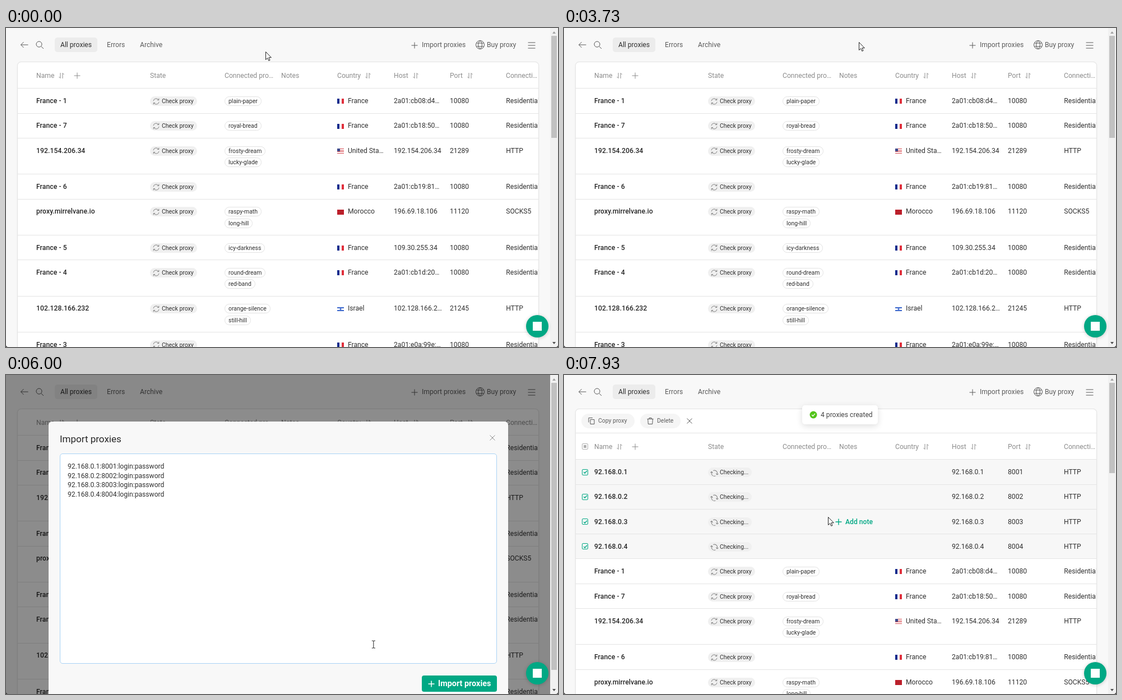
An HTML page that plays this animation: 985x569 px, repeating every 8 s.

```html
<!DOCTYPE html>
<html lang="en">
<head>
<meta charset="utf-8">
<title>Import proxies</title>
<style>
html, body { margin: 0; width: 100%; height: 100%; overflow: hidden; }
body { background: #f8f8f8; font: 12.13px/16px Roboto, Arial, sans-serif; color: #303030; }
#stage { position: relative; width: 985px; height: 569px; overflow: hidden; background: #f8f8f8; }
.p, .box { position: absolute; white-space: pre; }
svg { width: 1px; height: 1px; overflow: visible; fill: none; stroke: #595959; stroke-width: 1; }
.dim { color: #8c8c8c; }
.dim svg, #modal > svg { stroke: #8c8c8c; }
.mid { color: #5c5c5c; }
.name { font-weight: 500; letter-spacing: .1px; color: #262626; }
.small { font-size: 10.45px; color: #5c5c5c; }
.pill, .tag { font-size: 10.45px; line-height: 17px; border-radius: 9px; box-sizing: border-box; height: 17px; }
.pill { background: #f0f0f0; padding: 0 6px 0 21px; }
.pill svg { stroke: #7a7a7a; stroke-width: .9; }
.tag { border: 1px solid #e2e2e2; background: #fff; padding: 0 6px; line-height: 15px; }
.flag { width: 12px; height: 9px; }
#card { left: 21px; top: 61px; width: 929px; height: 600px; overflow: hidden; background: #fff;
  border-radius: 6px 6px 0 0; box-shadow: 0 0 0 1px #e4e4e4, 0 1px 4px #0001; }
.row { position: relative; box-sizing: border-box; border-bottom: 1px solid #e4e4e4; }
.fresh { background: #f7f7f7; }
.new { display: none; }
.added .new { display: block; }
.check { width: 9px; height: 9px; border: 1px solid #00a884; border-radius: 2px; }
.check.gray { border-color: #b0b0b0; }
.green { color: #00a884; font-weight: 500; }
.green svg, .check svg { stroke: #00a884; stroke-width: 1.4; }
#mask { inset: 0; background: #000; }
#modal { left: 76px; top: 83.4px; width: 819.5px; height: 502px; background: #f8f8f8; border-radius: 6px;
  transform-origin: 669px -45.4px; }
#title { left: 20px; top: 22.6px; font-size: 17px; color: #262626; }
#area { left: 20px; top: 56.8px; width: 777.5px; height: 373px; background: #fff; border: 1px solid; border-radius: 5px; }
#area .p { left: 13px; top: 13.8px; line-height: 16.7px; }
#hint { color: #757575; }
#go { left: 666px; top: 452.6px; width: 133.5px; height: 29.4px; border-radius: 4px; background: #00a884;
  color: #fff; font: 700 14.4px/29.4px Roboto, Arial, sans-serif; }
#go svg { stroke: #fff; stroke-width: 1.5; }
#bar { left: 971px; top: 0; width: 14px; height: 569px; background: #f1f1f1; }
#thumb { left: 2px; top: 14px; width: 10px; }
#chat { left: 928px; top: 512px; width: 40px; height: 40px; border-radius: 50%; background: #00a884;
  box-shadow: 0 1px 6px #0003; }
#toast { left: 425px; top: 54px; width: 135px; height: 34px; border-radius: 5px; background: #fff;
  box-shadow: 0 3px 12px #0002; color: #444; }
#panel { left: 628px; top: 0; width: 357px; height: 569px; background: #272727; color: #f4f4f4;
  box-shadow: 0 0 36px rgba(0,0,0,.75); font: 11.17px/15.2px "Noto Sans Mono", "DejaVu Sans Mono", monospace; }
.sel { left: 0; top: 0; height: 15.2px; background: #0078d7; }
.line { position: relative; }
</style>
</head>
<body>
<div id="stage"></div>
<script>
const LOOP = 8000;
const $ = id => document.getElementById(id);

const PATHS = {
  plus: 'M-5.5 0h11M0-5.5v11',
  back: 'M6.5 0h-13M-1.5-5l-5 5 5 5',
  search: 'M4-1a5 5 0 1 1-10 0a5 5 0 1 1 10 0M2.6 2.6l4.4 4.4',
  menu: 'M-6.5-5h13M-6.5 0h13M-6.5 5h13',
  globe: 'M7.5 0a7.5 7.5 0 1 1-15 0a7.5 7.5 0 1 1 15 0zM-6.5-3h13M-6.5 3h13M0-7.5c-4.5 4-4.5 11 0 15c4.5-4 4.5-11 0-15',
  sort: 'M-2-5v9.5m-2.5-2.5l2.5 2.5M2 5v-9.5m2.5 2.5l-2.5-2.5',
  sync: 'M-5-.8a5 5 0 0 1 9.3-1.8M4.8-5.5v3h-3M5 .8a5 5 0 0 1-9.3 1.8M-4.8 5.5v-3h3',
  copy: 'M-2-2.5h7v8h-7zM-5 2.5v-8h7',
  trash: 'M-5.5-3.5h11M-2-3.5v-2h4v2M-4.3-3.5l.6 9h7.4l.6-9',
  close: 'M-4.5-4.5l9 9M4.5-4.5l-9 9',
  tick: 'M-2.8 0l2 2.2 3.8-4.4'
};
const icon = (x, y, name, attrs = '') =>
  `<svg class="p" style="left:${x}px;top:${y}px" ${attrs}><path d="${PATHS[name]}"/></svg>`;
const put = (x, y, text, cls = '') =>
  `<div class="p ${cls}" style="left:${x}px;top:${y - 8}px">${text}</div>`;
const box = (x, y, w, h, css) =>
  `<div class="box" style="left:${x}px;top:${y}px;width:${w}px;height:${h}px;${css}"></div>`;

const CARD_X = 21;
const cell = (x, y, text, cls) => put(x - CARD_X, y, text, cls);
const mark = (x, y, name) => icon(x - CARD_X, y, name);
const row = (h, inner, cls = '') => `<div class="row ${cls}" style="height:${h}px">${inner}</div>`;

const stripes = (dir, ...colors) => `linear-gradient(${dir},` +
  colors.map((c, i) => `${c} ${i * 100 / colors.length}% ${(i + 1) * 100 / colors.length}%`) + ')';
const FLAGS = {
  France: stripes('90deg', '#0a2a8c', '#fff', '#e0303c'),
  'United Sta…': 'linear-gradient(#3c4a8c,#3c4a8c) 0 0/5px 5px no-repeat,' +
    stripes('180deg', '#d84a50', '#fff', '#d84a50', '#fff', '#d84a50', '#fff', '#d84a50'),
  Morocco: 'radial-gradient(#a8282c 15%,#bd1f2b 30%)',
  Israel: 'radial-gradient(#3a66cc 14%,#0000 24%),' +
    stripes('180deg', '#fff', '#3a66cc', '#fff', '#fff', '#fff', '#3a66cc', '#fff')
};

const DATA = `France - 1|plain-paper|France|2a01:cb08:d4…|10080|Residential
France - 7|royal-bread|France|2a01:cb18:50…|10080|Residential
192.154.206.34|frosty-dream,lucky-glade|United Sta…|192.154.206.34|21289|HTTP
France - 6||France|2a01:cb19:81…|10080|Residential
proxy.mirrelvane.io|raspy-math,long-hill|Morocco|196.69.18.106|11120|SOCKS5
France - 5|icy-darkness|France|109.30.255.34|10080|Residential
France - 4|round-dream,red-band|France|2a01:cb1d:20…|10080|Residential
102.128.166.232|orange-silence,still-hill|Israel|102.128.166.2…|21245|HTTP
France - 3||France|2a01:e0a:99e:…|10080|Residential`;

const pill = (text, attrs) => cell(257, 21.8, icon(11, 8.5, 'sync', attrs) + text, 'pill');

const proxyRow = line => {
  const [name, tags, land, host, port, type] = line.split('|');
  const list = tags.split(',').filter(Boolean);
  return row(list.length > 1 ? 64.4 : 44.3,
    cell(54, 21.8, name, 'name') + pill('Check proxy') +
    list.map((tag, i) => cell(390, 21.8 + 20.3 * i, tag, 'tag')).join('') +
    `<div class="p flag" style="left:570px;top:18px;background:${FLAGS[land]}"></div>` +
    cell(610, 21.8, land) + cell(692, 21.8, host) + cell(792, 21.8, port) + cell(892.3, 21.8, type));
};

const checkbox = (y, inner, cls = '') =>
  `<div class="p check ${cls}" style="left:11px;top:${y - 5.5}px"><div class="ticked">${inner}</div></div>`;

const freshRow = n => row(44.3,
  checkbox(21.8, icon(4.5, 4.5, 'tick')) + cell(54, 21.8, '92.168.0.' + n, 'name') +
  pill('Checking...', 'data-spin') +
  (n == 3 ? `<div id="note" class="green">${mark(490, 22, 'plus')}${cell(502, 21.8, 'Add note')}</div>` : '') +
  cell(692, 21.8, '92.168.0.' + n) + cell(792, 21.8, '800' + n) + cell(892, 21.8, 'HTTP'), 'fresh');

const chip = (x, w, name, text) =>
  box(x - CARD_X, 8, w, 26, 'background:#f5f5f5;border-radius:13px') +
  mark(x + 18, 21, name) + cell(x + 30, 21, text, 'small');

const HEADS = [[54, 'Name'], [257, 'State'], [390, 'Connected pro…'], [491, 'Notes'],
  [591, 'Country'], [692, 'Host'], [792, 'Port'], [892, 'Connecti…']];
const card = '<div id="card" class="box">' +
  row(43, chip(31, 95, 'copy', 'Copy proxy') + chip(136, 72, 'trash', 'Delete') + mark(224, 21, 'close'), 'new') +
  row(47.3, `<div class="new">${checkbox(23.5, box(2, 2, 5, 5, 'background:#b0b0b0'), 'gray')}</div>` +
    HEADS.map(([x, s]) => cell(x, 23.8, s)).join('') +
    [99, 646, 731, 828].map(x => mark(x, 23.8, 'sort')).join('') + mark(126.5, 24, 'plus'), 'dim') +
  `<div class="new">${[1, 2, 3, 4].map(freshRow).join('')}</div>` +
  DATA.split('\n').map(proxyRow).join('') + '</div>';

const HINT = `Type or paste proxy servers...

Allowed formats:
  •  192.168.0.1:8000
  •  http://192.168.0.1:8000:myproxy[https://change-my-proxy.com]
  •  socks5://login:password@192.168.0.1:8000
  •  192.168.0.1:8000:login:password

*Additionally you can add :name at the end for any of formats
**Empty type at the beginning will cause HTTP type
***At the end, for each proxy, you can specify a link to change IP in square brackets`;
const SERVERS = [1, 2, 3, 4].map(n => `92.168.0.${n}:800${n}:login:password`);

$('stage').innerHTML =
  box(87, 17, 76, 26, 'background:#ececec;border-radius:5px') +
  icon(33, 30, 'back', 'stroke-width="1.3"') + icon(60, 30, 'search') +
  put(97, 29.8, 'All proxies') + put(180, 29.8, 'Errors', 'mid') + put(239, 29.8, 'Archive', 'mid') +
  icon(729, 30.5, 'plus') + put(742, 29.8, 'Import proxies', 'mid') +
  icon(846, 30, 'globe') + put(858, 29.8, 'Buy proxy', 'mid') + icon(937.5, 30.5, 'menu') +
  card +
  `<div id="mask" class="box"></div>
  <div id="modal" class="box">
    <div id="title" class="p">Import proxies</div>${icon(792, 28.6, 'close')}
    <div id="area" class="box"><div id="hint" class="p">${HINT}</div><div id="pasted" class="p">${SERVERS.join('\n')}</div></div>
    <div id="go" class="box">${icon(17, 15, 'plus')}<div class="p" style="left:29px">Import proxies</div></div>
  </div>
  <div id="bar" class="box"><div id="thumb" class="box"></div>
    <svg class="p" style="left:7px;top:0" stroke="none"><g stroke="none"><path d="M-3 10l3-4 3 4z" fill="#a0a0a0"/><path d="M-3 560l3 4 3-4z" fill="#505050"/></g></svg></div>
  <div id="chat" class="box">${box(12, 12, 16, 16, 'background:#fff')}</div>
  <div id="toast" class="box"><svg class="p" style="left:20px;top:17px"><circle r="6.5" fill="#52c41a" stroke="none"/><path d="${PATHS.tick}" stroke="#fff" stroke-width="1.3"/></svg>${put(33, 17, '4 proxies created')}</div>
  <div id="panel" class="box"><div class="box" style="left:13px;top:225px">${
    SERVERS.map(s => `<div class="line"><div class="box sel"></div><span class="line">${s}</span></div>`).join('')}</div></div>
  <svg class="p" style="left:0;top:0"><path d="M0 565q0 4 4 4h-4zM985 565q0 4-4 4h4z" fill="#222" stroke="none"/></svg>
  <svg id="cursor" class="p" style="left:0;top:0">
    <path id="arrow" d="M.5 .5v14l3.2-3 2.1 4.8 2.2-.9-2.1-4.7h4.4z" fill="#fff" stroke="#222"/>
    <path id="beam" d="M-3-6.5h2q1 0 1 1q0-1 1-1h2M0-5.5v11M-3 6.5h2q1 0 1-1q0 1 1 1h2"/></svg>`;

const ramp = (t, a, b) => Math.min(1, Math.max(0, (t - a) / (b - a)));
const bezier = (x1, y1, x2, y2) => x => {
  const curve = (s, a, b) => 3 * (1 - s) ** 2 * s * a + 3 * (1 - s) * s * s * b + s ** 3;
  let lo = 0, hi = 1;
  for (let i = 0; i < 20; i++) {
    const s = (lo + hi) / 2;
    if (curve(s, x1, x2) < x) lo = s; else hi = s;
  }
  return x <= 0 ? 0 : x >= 1 ? 1 : curve(lo, y1, y2);
};
const outCirc = bezier(.08, .82, .17, 1);
const inOutCirc = bezier(.78, .14, .15, .86);

// time, x, y; a fourth value means the stretch up to it runs at steady speed
const MOVES = [
  [400, 463, 42], [730, 974, 55], [930, 911, 14], [1470, 911, 14], [1730, 684, 241], [2130, 645, 236],
  [2270, 645, 236], [2870, 844, 283], [3200, 844, 283], [3730, 526, 25], [3870, 526, 25], [4400, 745, 32.5],
  [4730, 745, 32.5], [5070, 520, 300], [5270, 520, 300], [5600, 555, 365, 1], [5930, 622, 450, 1],
  [6000, 655, 480, 1], [6070, 713, 519, 1], [6130, 745, 535, 1], [6530, 775, 553], [6730, 775, 553],
  [7070, 509, 271], [7270, 509, 271], [7330, 512, 265, 1], [7930, 471, 253]
];
function pointer(t) {
  const i = MOVES.findIndex(m => m[0] > t);
  if (i < 1) return (i ? MOVES[MOVES.length - 1] : MOVES[0]).slice(1, 3);
  const [a, b] = [MOVES[i - 1], MOVES[i]];
  let p = ramp(t, a[0], b[0]);
  if (!b[3]) p = p * p * (3 - 2 * p);
  return [1, 2].map(k => a[k] + (b[k] - a[k]) * p);
}

const show = (el, on) => el.style.visibility = on ? 'inherit' : 'hidden';
const fade = (el, k) => { el.style.opacity = k; show(el, k > 0); };

function draw(t) {
  const [x, y] = pointer(t);
  const within = (a, b) => t >= a && t < b;

  const added = t >= 7260;
  $('card').classList.toggle('added', added);
  document.querySelectorAll('.ticked').forEach(el => fade(el, ramp(t, 7350, 7500)));
  document.querySelectorAll('[data-spin]').forEach(el => el.style.transform = `rotate(${(t - 7270) * .36}deg)`);
  show($('note'), t > 7620);

  const open = outCirc(ramp(t, 4440, 4740)) - inOutCirc(ramp(t, 7290, 7590));
  fade($('modal'), open);
  $('modal').style.transform = open < 1 ? `scale(${.2 + .8 * open})` : 'none';
  fade($('mask'), .45 * (ramp(t, 4440, 4640) - ramp(t, 7290, 7540)));
  const pasted = within(5270, 7265);
  show($('pasted'), pasted);
  show($('hint'), !pasted);
  $('area').style.borderColor = t < 5050 ? '#dcdcdc' : t < 6430 ? '#a9d3f5' : '#c3dcea';

  $('thumb').style.height = (within(4430, 7600) ? 512 : added ? 161 : 182) + 'px';
  $('thumb').style.background = x > 970 ? '#a8a8a8' : '#c1c1c1';

  const drop = inOutCirc(ramp(t, 7204, 7504));
  fade($('toast'), added ? drop : 0);
  $('toast').style.transform = `translateY(${-43 * (1 - drop)}px)`;

  fade($('panel'), ramp(t, 1110, 1180) - ramp(t, 3180, 3250));
  const at = Math.floor((y - 225) / 15.2);
  document.querySelectorAll('.sel').forEach((el, i) => {
    const w = t < 2270 || i > at ? 0 : i < at ? 201 : Math.min(201, Math.max(0, x - 641));
    el.style.width = w + 'px';
  });

  const inPanel = within(1480, 3200);
  const inArea = within(4750, 7400) && x > 96 && x < 875 && y > 141 && y < 522;
  show($('beam'), inPanel || inArea);
  show($('arrow'), !(inPanel || inArea));
  $('beam').style.stroke = inPanel ? '#eee' : '#222';
  $('cursor').style.transform = `translate(${x}px,${y}px)`;
}

function tick() {
  draw(performance.now() % LOOP);
  requestAnimationFrame(tick);
}
tick();
</script>
</body>
</html>
```
